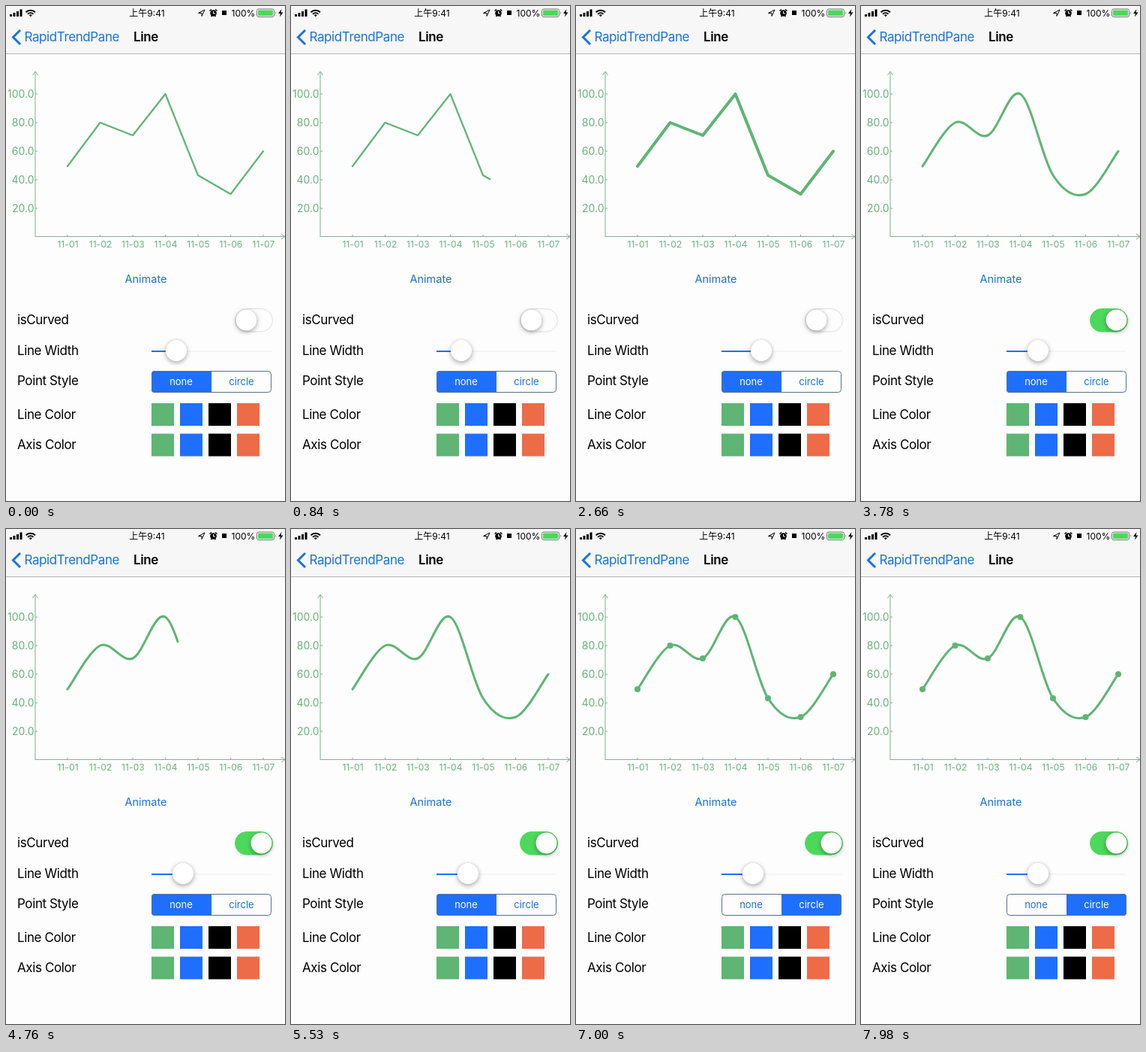
An HTML page that plays this animation: 372x658 px, repeating every 8000 ms.

```html
<!DOCTYPE html>
<html lang="en">
<head>
<meta charset="utf-8">
<title>Line chart settings</title>
<style>
  html, body { margin: 0; width: 100%; height: 100%; overflow: hidden; background: #fdfdfd; }
  svg { display: block; width: 100%; height: 100%; }
  text { font: 17px Inter, "Noto Sans CJK SC", sans-serif; letter-spacing: -.4px; }
  .status { font-size: 12px; letter-spacing: 0; }
  .title { font-weight: 600; }
  .blue { fill: #1a73e0; }
  .tick { font-size: 14px; letter-spacing: 0; fill: #6ab27d; text-anchor: end; }
  .date { font-size: 12px; letter-spacing: .1px; fill: #6ab27d; text-anchor: middle; }
  .segment { font-size: 13px; letter-spacing: 0; text-anchor: middle; }
  .axis { fill: none; stroke: #76b687; }
  .thumb { fill: #fff; filter: drop-shadow(0 2.5px 3px #0004) drop-shadow(0 0 .5px #0005); }
</style>
</head>
<body>
<svg viewBox="0 0 372 658">
  <rect width="372" height="658" fill="#fdfdfd"/>
  <rect width="372" height="63.5" fill="#f7f7f7"/>
  <path d="M0 63.5H372" stroke="#b5b5b5"/>

  <g id="statusBar">
    <path d="M5 11h3v3H5zM9.5 9h3v5h-3zM14 7h3v7h-3zM18.5 4.500h3V14h-3z"/>
    <g fill="none" stroke="#000" stroke-width="2">
      <path d="M26.500 8.200a9 9 0 0 1 12.500 0M29 10.800a5.500 5.500 0 0 1 7.500 0"/>
    </g>
    <path d="M30.800 12.200a3 3 0 0 1 4 0l-2 2z"/>
    <text class="status" x="188" y="13.500" text-anchor="middle" font-weight="500">上午9:41</text>
    <path d="M256.500 9.500L265 5l-4 8.500v-4z" fill="none" stroke="#000"/>
    <circle cx="276.500" cy="9.500" r="4.300"/>
    <path d="M271.500 6.500l2.500-2M281.500 6.500l-2.500-2M273.500 14l1-1M279.500 14l-1-1" stroke="#000" stroke-width="1.500"/>
    <path d="M276.500 7v3h2.500" fill="none" stroke="#fff"/>
    <rect x="288" y="6" width="6" height="6"/>
    <text class="status" x="300.500" y="13.500">100%</text>
    <rect x="334.500" y="4" width="23" height="10.500" rx="2.500" fill="none" stroke="#777"/>
    <rect x="336" y="5.500" width="20" height="7.500" rx="1" fill="#4cd95b"/>
    <path d="M359 7.500q2 1.700 0 3.500z" fill="#777"/>
    <path d="M367.500 4l-4.500 6h3l-1 4.500 4.500-6h-3z"/>
  </g>

  <path d="M19 32L9.500 41.500L19 51" fill="none" stroke="#1a73e0" stroke-width="3"/>
  <text class="blue" x="24.500" y="47">RapidTrendPane</text>
  <text class="title" x="186.500" y="47" text-anchor="middle">Line</text>

  <g id="axes">
    <path class="axis" d="M39 307V87M35.500 92L39 87L42.500 92"/>
    <path class="axis" d="M39 306.500H372M367 303L372 306.500L367 310" style="stroke:#8fac98"/>
  </g>
  <path id="line" fill="none" stroke="#5eb574" stroke-linejoin="round" stroke-linecap="round" pathLength="1"/>
  <g id="dots" fill="#5eb574"></g>

  <text class="blue" x="186.500" y="367.500" text-anchor="middle" style="font-size:14.500px;letter-spacing:0">Animate</text>
  <g id="labels"></g>

  <rect id="track" x="305.500" y="402.500" width="50" height="30.500" rx="15.250"/>
  <circle id="knob" class="thumb" cy="417.500" r="14"/>
  <path d="M194 459H354" stroke="#f5f5f5" stroke-width="2"/>
  <path id="filled" stroke="#1f6fff" stroke-width="2"/>
  <circle id="slider" class="thumb" cy="458" r="14.200"/>

  <clipPath id="rounded"><rect x="194" y="485" width="160" height="29" rx="4"/></clipPath>
  <rect id="selected" y="485" width="80" height="29" fill="#1f6fff" clip-path="url(#rounded)"/>
  <rect x="194.500" y="485.500" width="159" height="28" rx="4" fill="none" stroke="#56718f"/>
  <text id="none" class="segment" x="233.500" y="504">none</text>
  <text id="circle" class="segment" x="314" y="504">circle</text>
  <g id="swatches"></g>
</svg>
<script>
const LOOP = 8000, STEP = 70, DRAW_TIME = 1000;
const DRAW_STARTS = [100, 4230];
const TOGGLE_AT = 3200, CIRCLE_AT = 5700;
const DRAG = [[1450, 227], [2100, 262], [2660, 247], [2980, 236]];
const POINTS = [[82, 213], [125.5, 155], [169, 172], [212.5, 117], [256, 225], [299.5, 250], [343, 193]];

const $ = id => document.getElementById(id);

function add(parent, tag, attributes, content = '') {
  const node = document.createElementNS('http://www.w3.org/2000/svg', tag);
  for (const name in attributes) node.setAttribute(name, attributes[name]);
  node.textContent = content;
  $(parent).append(node);
}

function set(id, attributes) {
  for (const name in attributes) $(id).setAttribute(name, attributes[name]);
}

POINTS.forEach(([x, y], i) => {
  add('axes', 'path', { class: 'axis', d: `M${x} 307v-3` });
  add('axes', 'text', { class: 'date', x: x + .5, y: 321 }, `11-0${i + 1}`);
  add('dots', 'circle', { cx: x, cy: y, r: 4 });
});
for (let value = 20; value <= 100; value += 20) {
  const y = 307 - value * 1.9;
  add('axes', 'path', { class: 'axis', d: `M39 ${y}h3` });
  add('axes', 'text', { class: 'tick', x: 37.5, y: y + 5 }, value.toFixed(1));
}
[['isCurved', 423], ['Line Width', 463.5], ['Point Style', 504], ['Line Color', 548.5], ['Axis Color', 589]]
  .forEach(([label, y]) => add('labels', 'text', { x: 15, y }, label));
for (const y of [528, 568.5]) {
  ['#5eb574', '#1f6fff', '#000', '#ee6b47'].forEach((fill, i) =>
    add('swatches', 'rect', { x: 194 + 38 * i, y, width: 30, height: 30, fill }));
}

const straightPath = 'M' + POINTS.join('L');

// Catmull-Rom spline through the points, as cubic segments
const curvedPath = 'M' + POINTS[0] + POINTS.slice(1).map((end, i) => {
  const start = POINTS[i];
  const before = POINTS[i - 1] || start, after = POINTS[i + 2] || end;
  const control1 = start.map((v, k) => v + (end[k] - before[k]) / 6);
  const control2 = end.map((v, k) => v - (after[k] - start[k]) / 6);
  return `C${control1} ${control2} ${end}`;
}).join('');

const clamp = v => Math.min(1, Math.max(0, v));
const ease = v => v * v * (3 - 2 * v);

function sliderAt(t) {
  let x = DRAG[0][1];
  for (let i = 1; i < DRAG.length; i++) {
    const [t0, x0] = DRAG[i - 1], [t1, x1] = DRAG[i];
    x += (x1 - x0) * ease(clamp((t - t0) / (t1 - t0)));
  }
  return x;
}

function render(t) {
  const x = sliderAt(t);
  const start = DRAW_STARTS.filter(s => s <= t).pop() ?? -DRAW_TIME;
  const drawn = clamp((t - start) / DRAW_TIME);
  set('line', {
    d: t < TOGGLE_AT + 100 ? straightPath : curvedPath,
    'stroke-width': 2.2 + (x - 227) / 11,
    'stroke-dasharray': drawn < 1 ? `${drawn} 2` : 'none'
  });
  set('slider', { cx: x });
  set('filled', { d: `M194 459H${x}` });

  const on = ease(clamp((t - TOGGLE_AT) / 280));
  set('knob', { cx: 320.5 + 20 * on });
  set('track', {
    fill: `rgba(76,217,91,${on})`,
    stroke: on > .5 ? '#4cd95b' : '#dedede'
  });

  const circles = t >= CIRCLE_AT;
  set('dots', { visibility: circles ? 'visible' : 'hidden' });
  set('selected', { x: circles ? 274 : 194 });
  set('none', { fill: circles ? '#1a73e0' : '#fff' });
  set('circle', { fill: circles ? '#fff' : '#1a73e0' });
}

function frame() {
  const t = performance.now() % LOOP;
  render(Math.floor(t / STEP) * STEP);
  requestAnimationFrame(frame);
}
frame();
</script>
</body>
</html>
```
